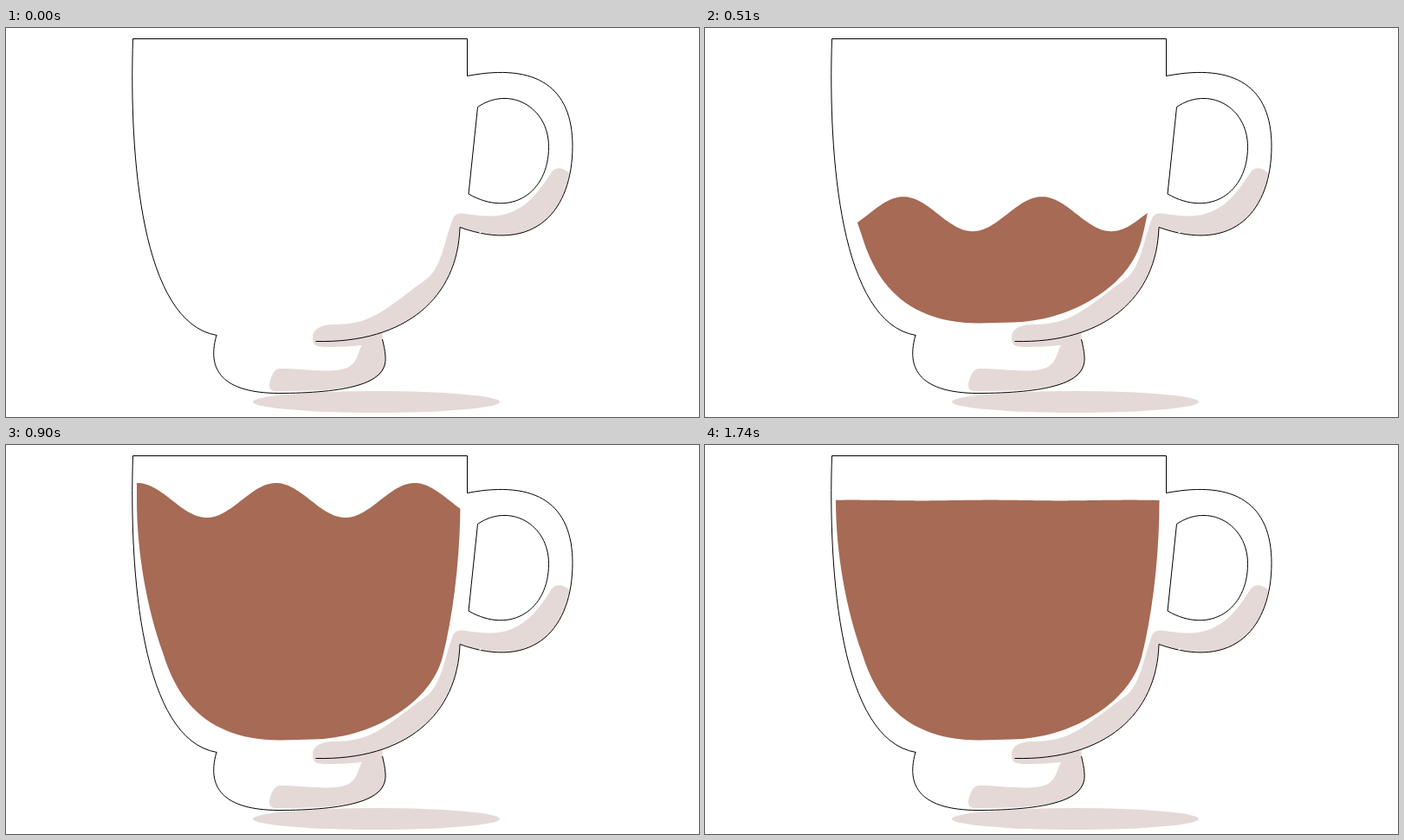
An HTML page for the animation above (1.77 s loop, 800 by 450 pixels).

```html
<!DOCTYPE html>
<html lang="en">
<head>
<meta charset="utf-8">
<title>Filling cup</title>
<style>
  html, body { margin: 0; width: 100%; height: 100%; overflow: hidden; background: #fff; }
  svg { display: block; width: 800px; height: 450px; }
  .shade { fill: #e4d9d7; }
  .line { fill: none; stroke: #000; }
</style>
</head>
<body>
<svg viewBox="0 0 800 450">
  <clipPath id="inside">
    <path d="M151 64V40H524.5V57C525 120 518 190 504 245C490 300 420 339.500 355 340.500L316 341.500C234 341 198 297 181 240C163 190 151 125 151 64Z"/>
  </clipPath>

  <g class="shade">
    <ellipse cx="427.5" cy="432.5" rx="142.5" ry="12.5"/>
    <path d="M357 362C351 359 353 344 376 343C402 343 418 339 440 324C458 312 470 301 482 293C502 281 505 250 515 223C517 216 521 214 528 214.5C545 217 556 219 574 216C603 209 617 186 629 168C634 160 643 161 650.5 168C638 233 592 254 524 230C521 311 462 365 357 362Z"/>
    <path d="M354 358C354 367 357 369 372 369C388 369 399 368 411 367C405 377 407 386 394 393C377 400 345 394 316 394C309 394 305 405 304 412C304 418 306 420 312 420C340 420 365 420 388 416.500C425 412 440 402 438 380C437.500 372 436 367 434.500 360V352C410 360 385 363 357 362Z"/>
  </g>

  <path id="drink" fill="#a66a55" clip-path="url(#inside)"/>

  <g class="line">
    <path d="M243.500 355.500C156.500 341 142 150 146.500 12.500H532.500V55.500C613 40 654 69 654 136.500C654 210.500 611.500 262 524 230.500C521.500 311 462.500 365 357.500 362.500"/>
    <path d="M243 355.500C230 400.500 256 423.500 320 422.500C400 421.500 440.500 410 438 380C437.500 372 436 367 434.500 360"/>
    <path d="M544.500 91.500C580.500 66.500 626.500 90.500 626.500 137.500C626.500 190.500 583 220 534 192Z"/>
  </g>
  <path d="M546.500 236.500h2" stroke="#fff" stroke-width="2"/>
</svg>
<script>
  const LOOP = 1770, HOLD = 150, STEP = 30;
  const FULL = 64, WAVELENGTH = 160;
  const drink = document.getElementById('drink');

  function surface(step) {
    const level = Math.max(FULL, 366.4 - 11.63 * step);
    const height = Math.max(0.4, 20 - 2 * Math.max(0, step - 26));
    let d = 'M140 360';
    for (let x = 140; x <= 536; x += 2) {
      const angle = 2 * Math.PI * (x + 13.8) / WAVELENGTH - step / 4;
      d += `L${x} ${(level - height * Math.cos(angle)).toFixed(2)}`;
    }
    return d + 'V360Z';
  }

  function draw() {
    const time = performance.now() % LOOP;
    const step = time < HOLD ? 0 : Math.floor((time - HOLD) / STEP) + 1;
    drink.setAttribute('d', surface(step));
    requestAnimationFrame(draw);
  }
  draw();
</script>
</body>
</html>
```
